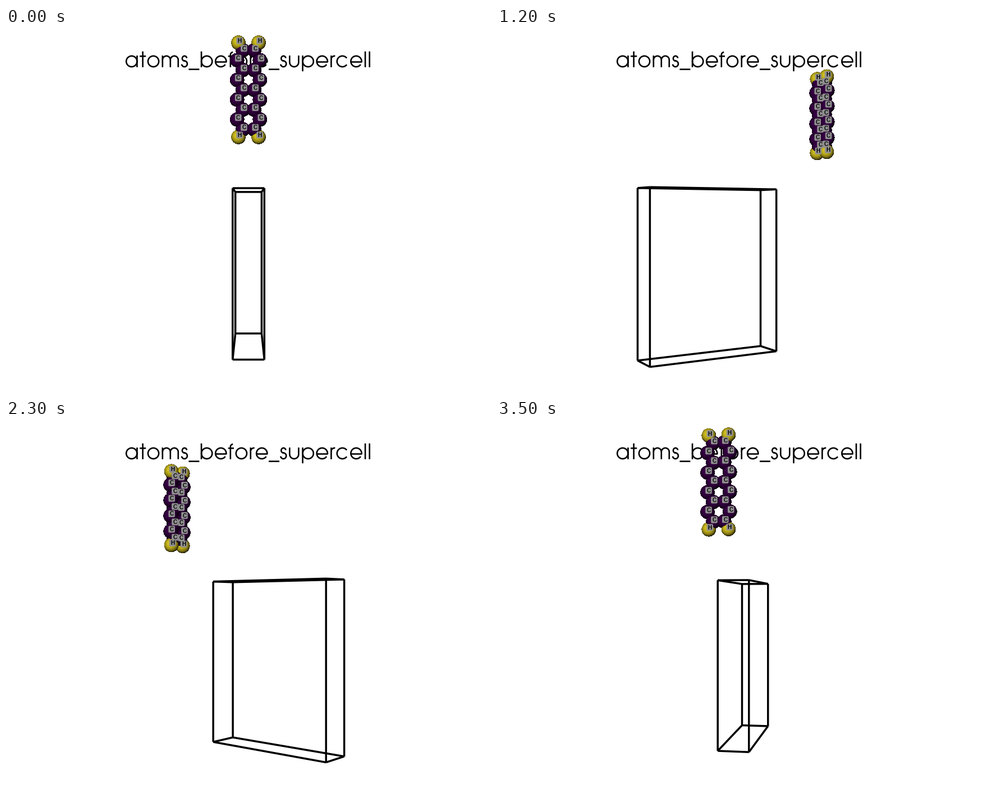
A matplotlib script for the animation above (3600 ms loop, 864 by 648 pixels).

```python
import numpy as np
import matplotlib.pyplot as plt
from matplotlib.animation import FuncAnimation
from matplotlib.collections import LineCollection
from matplotlib.patches import FancyBboxPatch

W, H, DPI = 864, 648, 100
FRAMES, INTERVAL = 36, 100
PX = 72 / DPI                              # points per pixel
FOCAL = H / 2 / np.tan(np.radians(15))     # 30 degree view angle
CAM = 99.48                                # camera distance
R = 12.9                                   # sphere radius in pixels

fig = plt.figure(figsize=(W / DPI, H / DPI), dpi=DPI, facecolor="white")
ax = fig.add_axes([0, 0, 1, 1])
ax.axis("off")


def project(pts, angle):
    """Orbit the camera about the vertical axis; return x, y, depth."""
    x, y, z = np.asarray(pts, float).T
    c, s = np.cos(angle), np.sin(angle)
    depth = CAM + x * s + y * c
    k = FOCAL / depth
    return W / 2 + (x * c - y * s) * k, H / 2 - z * k, depth


# --- unit cell -------------------------------------------------------------
HX, Y0, Y1, Z0, Z1 = 2.21, -5.0, 15.0, -20.81, 3.04
corners = np.array([(x, y, z) for x in (-HX, HX) for y in (Y0, Y1) for z in (Z0, Z1)])
edges = [(i, i | bit) for i in range(8) for bit in (1, 2, 4) if not i & bit]

# --- armchair ribbon: 18 C and 4 H -----------------------------------------
TOP, ROW, BOND, CH = 20.81, 1.23, 1.42, 0.944
atoms, kinds = [], []
for row in range(9):
    dx = BOND if row % 2 else BOND / 2
    for side in (-1, 1):
        atoms.append((side * dx, -15, TOP - CH - row * ROW))
        kinds.append("C")
for z in (TOP, TOP - 2 * CH - 8 * ROW):
    for side in (-1, 1):
        atoms.append((side * 1.255, -15, z))
        kinds.append("H")
COLORS = {"C": np.array([68, 1, 84]) / 255, "H": np.array([253, 231, 37]) / 255}
LIGHT = np.array([-0.16, -0.26, 0.95])


def render_spheres(xs, ys, depths):
    img = np.zeros((H, W, 4))
    zbuf = np.full((H, W), np.inf)
    for x, y, d, kind in zip(xs, ys, depths, kinds):
        x0, y0, n = int(x - R) - 1, int(y - R) - 1, int(2 * R) + 4
        x0, y0 = max(x0, 0), max(y0, 0)
        gy, gx = np.mgrid[y0:y0 + n, x0:x0 + n]
        nx, ny = (gx + 0.5 - x) / R, (gy + 0.5 - y) / R
        rr = nx**2 + ny**2
        nz = np.sqrt(np.clip(1 - rr, 0, 1))
        z = d - nz * R * d / FOCAL
        win = np.s_[y0:y0 + n, x0:x0 + n]
        hit = (rr <= 1) & (z < zbuf[win])
        lit = np.clip(nx * LIGHT[0] + ny * LIGHT[1] + nz * LIGHT[2], 0, 1)
        shade = 0.12 + 0.74 * lit
        zbuf[win][hit] = z[hit]
        img[win][hit, :3] = shade[hit, None] * COLORS[kind]
        img[win][hit, 3] = 1
    return img


# --- title in a geometric stroke alphabet (1000 units per em) ---------------
def arc(cx, cy, rx, ry, a, b):
    t = np.radians(np.linspace(a, b, 40))
    return np.c_[cx + rx * np.cos(t), cy + ry * np.sin(t)]


def line(*pts):
    return np.array(pts, float)


def ring(cx, a=0, b=360):
    return arc(cx, 273, 253, 253, a, b)


def arch(x):
    return np.vstack([arc(x + 184, 342, 184, 184, 180, 0), line((x + 368, 0))])


S_CURVE = np.vstack([arc(194, 410, 108, 116, 8, 270), arc(190, 157, 132, 137, 90, -172)])
GLYPHS = {
    "a": (683, [ring(330), line((584, 0), (584, 547))]),
    "b": (682, [ring(350), line((96, 0), (96, 740))]),
    "c": (647, [ring(327, 37, 323)]),
    "e": (650, [np.vstack([line((76, 245), (578, 245)), ring(327, 0, 325)])]),
    "f": (314, [np.vstack([line((126, 0), (126, 580)), arc(256, 580, 130, 126, 180, 96)]),
                line((18, 515), (290, 515))]),
    "l": (200, [line((100, 0), (100, 740))]),
    "m": (938, [line((100, 0), (100, 547)), arch(100), arch(468)]),
    "o": (655, [ring(327)]),
    "p": (682, [ring(350), line((96, -192), (96, 547))]),
    "r": (301, [line((102, 0), (102, 547)), arc(262, 366, 160, 160, 180, 82)]),
    "s": (388, [S_CURVE]),
    "t": (339, [line((168, 0), (168, 740)), line((23, 515), (316, 515))]),
    "u": (608, [np.vstack([line((93, 547)), arc(304, 232, 211, 211, 180, 360),
                           line((515, 547))])]),
    "_": (500, [line((0, -100), (500, -100))]),
}


def draw_title(text, left=211.3, size=38, baseline=69.8):
    em, pen, strokes = size / 1000, left, []
    for ch in text:
        width, parts = GLYPHS[ch]
        strokes += [np.c_[pen + p[:, 0] * em, baseline - p[:, 1] * em] for p in parts]
        pen += width * em
    ax.add_collection(LineCollection(strokes, colors="black", linewidths=2.6 * PX,
                                     snap=False, zorder=1))


draw_title("atoms_before_supercell")

# --- artists ---------------------------------------------------------------
box = LineCollection([], colors="black", linewidths=3.5 * PX, snap=False, zorder=2)
ax.add_collection(box)
balls = ax.imshow(np.zeros((H, W, 4)), extent=(0, W, H, 0), aspect="auto",
                  interpolation="nearest", zorder=3)
ax.set_xlim(0, W)
ax.set_ylim(H, 0)

TAG_W, TAG_H = 11.6, 12
tags = []
for kind in kinds:
    plate = FancyBboxPatch((0, 0), TAG_W, TAG_H, facecolor="0.56", edgecolor="none",
                           boxstyle="round,pad=0,rounding_size=2")
    ax.add_patch(plate)
    letter = ax.text(0, 0, kind, family="Liberation Sans", weight="bold",
                     size=10 * PX, ha="center", va="baseline", color="black")
    tags.append((plate, letter))


def place_tags(xs, ys, depths):
    """Nearest tags win; a tag that would sit on a kept one is hidden."""
    kept = []
    for rank, i in enumerate(np.argsort(depths.round(6), kind="stable")):
        x, y = xs[i] + 2, ys[i] - 3.5
        show = not any(abs(x - u) < 5.2 and abs(y - v) < 8 for u, v in kept)
        if show:
            kept.append((x, y))
        plate, letter = tags[i]
        plate.set_bounds(x - TAG_W / 2, y - TAG_H / 2, TAG_W, TAG_H)
        letter.set_position((x, y + 3.5))
        for k, artist in enumerate((plate, letter)):
            artist.set_visible(show)
            artist.set_zorder(100 - 2 * rank + k)


def update(i):
    angle = 2 * np.pi * i / FRAMES
    cx, cy, _ = project(corners, angle)
    box.set_segments([[(cx[a], cy[a]), (cx[b], cy[b])] for a, b in edges])
    xs, ys, depths = project(atoms, angle)
    balls.set_data(render_spheres(xs, ys, depths))
    place_tags(xs, ys, depths)
    return [box, balls]


anim = FuncAnimation(fig, update, frames=FRAMES, interval=INTERVAL,
                     repeat=True, repeat_delay=0, blit=False)
plt.show()
```
